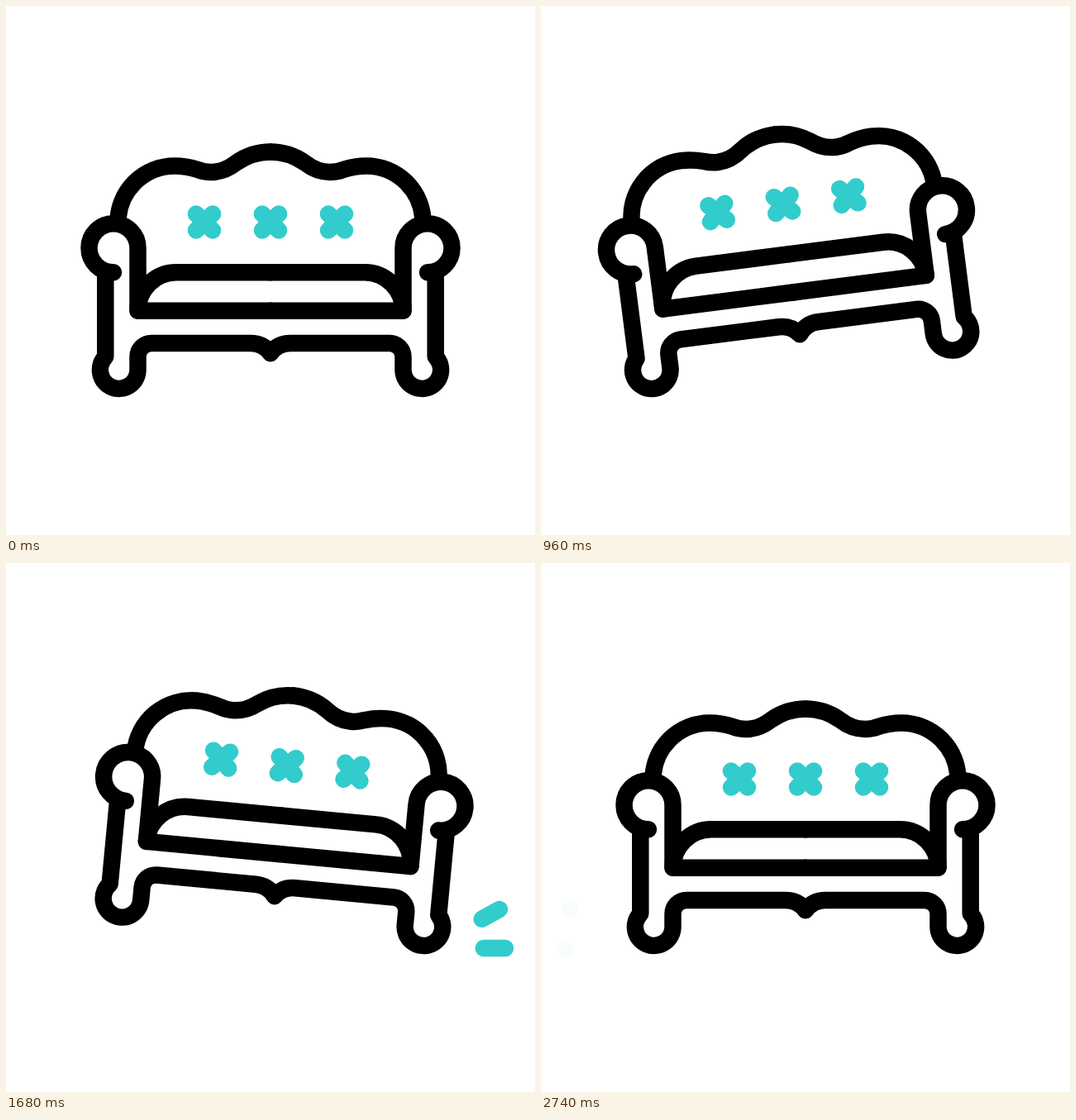
Recreate the animation shown at these times as an HTML page. Size 640 by 640 pixels, loop 3.02 s.

```html
<!DOCTYPE html>
<html lang="en">
<head>
<meta charset="utf-8">
<title>Rocking sofa</title>
<style>
  html, body { margin: 0; width: 100%; height: 100%; overflow: hidden; background: #fff; }
  svg { display: block; width: 100%; height: 100%; }
  g { fill: none; stroke-width: 20.5; stroke-linecap: round; stroke-linejoin: round; }
  .ink { stroke: #000; }
  .teal { stroke: #3cc; }
</style>
</head>
<body>
<svg viewBox="0 0 640 640">
  <defs>
    <g id="half">
      <path d="M135.5 262A68.5 68.5 0 0 1 204 193.5C215 193.5 224 195.5 232 198C237 200 243 201 248 201C259 201 269 197 278 190C290 181.5 304 176.5 320 176.5"/>
      <path d="M130 322.3A29.5 29.5 0 1 1 159.5 293V368.8H320"/>
      <path d="M159.5 368.8A46.5 46.5 0 0 1 206 322.3H320"/>
      <path d="M120.3 322.3V424.3A22.8 22.8 0 1 0 159.5 440.5V424.5A16.5 16.5 0 0 1 176 408H296C306 408 314 412 320 420"/>
    </g>
    <path id="flower" d="M-10-10L10 10M-10 10L10-10"/>
  </defs>
  <g id="sofa">
    <g class="ink">
      <use href="#half"/>
      <use href="#half" transform="matrix(-1 0 0 1 640 0)"/>
    </g>
    <g class="teal">
      <use href="#flower" x="240" y="261.5"/>
      <use href="#flower" x="320" y="261.5"/>
      <use href="#flower" x="400" y="261.5"/>
    </g>
  </g>
  <g class="teal" id="right"><line/><line/></g>
  <g class="teal" id="left"><line/><line/></g>
</svg>
<script>
const LOOP = 3020, STEP = 20, END = 2740;

// [time, tilt in degrees]; the sofa slows towards each peak and falls faster towards 0
const TILT = [
  [0, 0], [620, -10.2], [1256, 0], [1496, 6], [2072, 0],
  [2320, -3.2], [2480, 0], [2580, 1.75], [2700, 0]
];

// [group, start time, base x, direction]
const BURSTS = [['right', 1262, 566, 1], ['left', 2062, 67, -1]];
// [base y, dx, dy] of each dash
const DASHES = [[436, 31, -17], [466, 38, 0]];

const $ = id => document.getElementById(id);
const ramp = (t, a, b) => Math.min(1, Math.max(0, (t - a) / (b - a)));

function tiltAt(t) {
  for (let i = 1; i < TILT.length; i++) {
    const [t0, a] = TILT[i - 1], [t1, b] = TILT[i];
    if (t > t1) continue;
    const p = ramp(t, t0, t1);
    return a ? a * (1 - p * p) : b * (1 - (1 - p) ** 2);
  }
  return 0;
}

function drawBurst([id, start, x, dir], t) {
  const dt = t - start;
  const group = $(id);
  const fade = 1 - ramp(dt, 622, 680);
  group.style.opacity = dt < 0 ? 0 : ramp(dt, 0, 30) * fade;
  const tail = ramp(dt, 320, 635), head = ramp(dt, 0, 385);
  DASHES.forEach(([y, dx, dy], i) => {
    const line = group.children[i];
    const put = (n, p) => {
      line.setAttribute('x' + n, x + dir * dx * p);
      line.setAttribute('y' + n, y + dy * p);
    };
    put(1, tail);
    put(2, Math.max(head, tail + 0.001));
  });
}

function draw(now) {
  const t = Math.min(END, Math.floor(now % LOOP / STEP) * STEP);
  const tilt = tiltAt(t);
  const pivot = tilt < 0 ? 136.5 : 503.5;
  $('sofa').setAttribute('transform', `rotate(${tilt} ${pivot} 463)`);
  BURSTS.forEach(b => drawBurst(b, t));
}

const begin = performance.now();
function tick() {
  draw(performance.now() - begin);
  requestAnimationFrame(tick);
}
tick();
</script>
</body>
</html>
```
